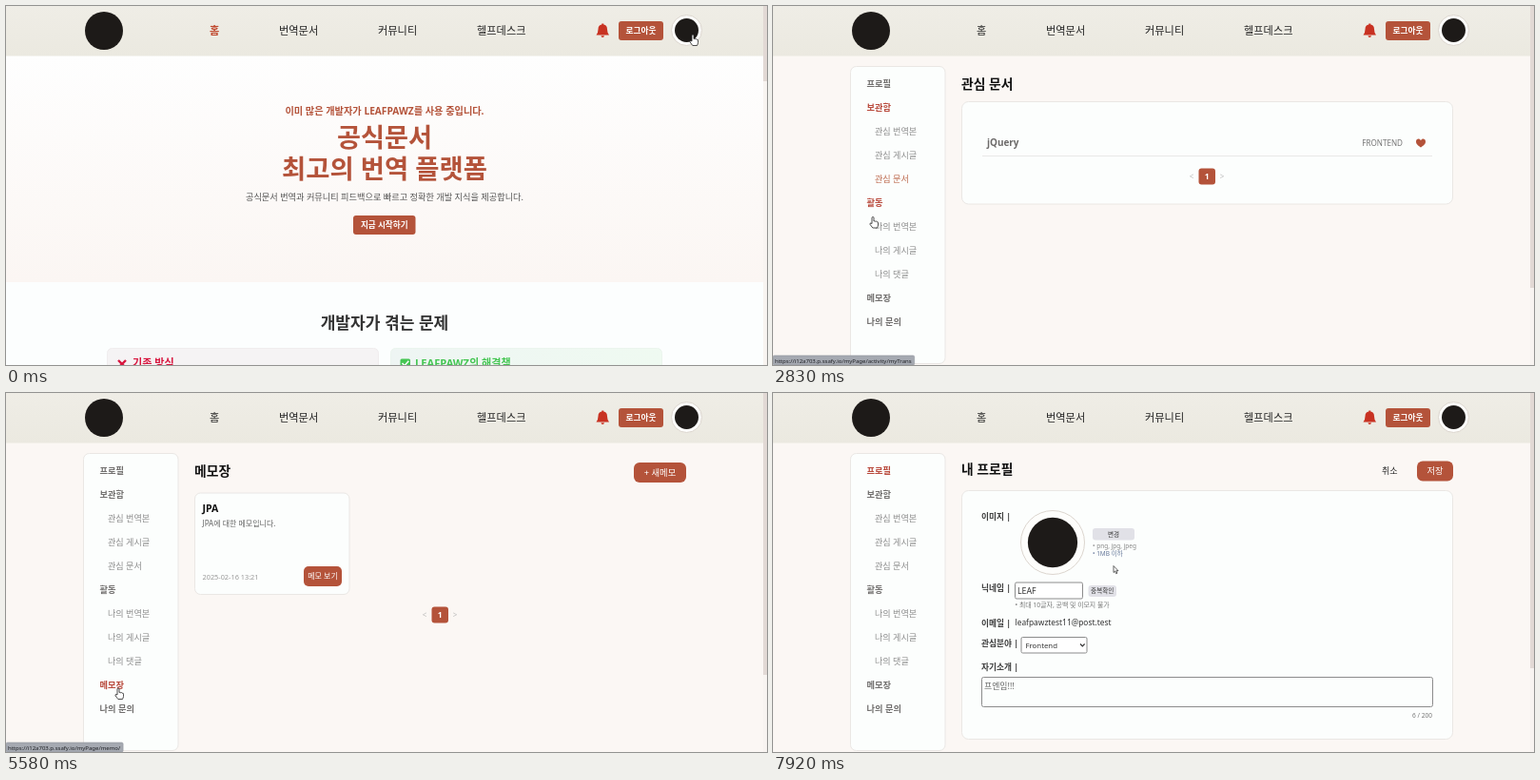
An HTML page for the animation above (8 s loop, 800x377 px).

```html
<!DOCTYPE html>
<html lang="ko">
<head>
<meta charset="utf-8">
<title>LEAFPAWZ</title>
<style>
html, body { margin: 0; width: 100%; height: 100%; overflow: hidden; background: #fbf7f4; }
svg { display: block; width: 100vw; height: 100vh; }
text { font-family: "Noto Sans", "Noto Sans CJK KR", "Noto Sans CJK", sans-serif; }
</style>
</head>
<body>
<svg id="stage" viewBox="0 0 800 377">
  <defs>
    <linearGradient id="bar" x2="0" y2="1"><stop stop-color="#efede6"/><stop offset="1" stop-color="#ebe9e0"/></linearGradient>
    <linearGradient id="hero" x2="0" y2="1"><stop stop-color="#fefefe"/><stop offset="1" stop-color="#fbf6f3"/></linearGradient>
    <linearGradient id="mint"><stop stop-color="#eef5f3"/><stop offset="1" stop-color="#effaf1"/></linearGradient>
    <path id="heart" d="M0 4.6C-2 2.8 -5 1.2 -5 -1.6C-5 -4.8 -1.300 -5.300 0 -2.800C1.300 -5.300 5 -4.800 5 -1.600C5 1.200 2 2.800 0 4.600Z"/>
  </defs>
  <g id="page"></g>
  <g id="status"><rect y="367" height="10" rx="1.5" fill="#a5a9b1" stroke="#8f939b" stroke-width=".5"/><text x="2" y="375" font-size="6" fill="#1d1f24"></text></g>
  <g id="cursor" stroke-linejoin="round">
    <path id="hand" fill="#fff" stroke="#222" stroke-width=".8" d="M-1 7V1Q-1 0 0 0T1 1V4.500Q2 3.800 2.700 4.800Q3.700 4.200 4.200 5.200Q5.500 4.800 5.500 6.200V8.500Q5.300 10 4.500 11.500H-.2L-3 7.800Q-3.300 6.300 -2 6.500Z"/>
    <path id="arrow" fill="#fff" stroke="#222" stroke-width=".7" d="M0 0V7L1.600 5.600L2.700 8.200L3.900 7.700L2.800 5.200H5Z"/>
  </g>
</svg>
<script>
const $ = id => document.getElementById(id);
const LOOP = 8000, STEP = 1000 / 12;
const BRICK = '#b4533a', CARD = '#fcfefd', LINE = '#eae7e4', INK = '#1d1a18';
const BRAND = 'LEAFPAWZ';

const text = (x, y, s, size, fill = '#666', weight = 400, anchor = 'start') =>
  `<text x="${x}" y="${y + size * 0.35}" font-size="${size}" fill="${fill}" font-weight="${weight}" text-anchor="${anchor}">${s}</text>`;
const box = (x, y, w, h, r, fill, stroke = 'none', sw = 1) =>
  `<rect x="${x}" y="${y}" width="${w}" height="${h}" rx="${r}" fill="${fill}" stroke="${stroke}" stroke-width="${sw}"/>`;
const rule = y => `<path d="M220 ${y}H693" stroke="#e9e8e7"/>`;
const heart = (x, y, fill = BRICK) => `<use href="#heart" x="${x}" y="${y}" fill="${fill}"/>`;
const button = (x, y, w, h, r, s, size, weight = 400, fill = BRICK, color = '#fff') =>
  box(x, y, w, h, r, fill) + text(x + w / 2, y + h / 2, s, size, color, weight, 'middle');
const avatar = (x, y, r) =>
  `<circle cx="${x}" cy="${y}" r="${r}" fill="#fdfdfb" stroke="#dcd6cf"/><circle cx="${x}" cy="${y}" r="${r * 0.78}" fill="${INK}"/>`;
const pager = y => text(440, y, '&lt;', 8, '#bbb', 400, 'middle') +
  button(447.5, y - 8.5, 17.5, 17, 3, '1', 8.5, 700) + text(472, y, '&gt;', 8, '#bbb', 400, 'middle');
const title = (s, y = 82) => text(198, y, s, 13.8, '#111', 700);
const card = bottom => box(198.5, 100.5, 516, bottom - 100.5, 7, CARD, LINE);

// Bookmark and translation lists share one row pitch.
const list = (name, rows, like) => {
  const end = 130 + rows.length * 27.5;
  const bottom = end + 50.5;
  let out = title(name) + card(Math.min(bottom, 390));
  rows.forEach(([s, note, size = 9.3], i) => {
    const y = 144 + i * 27.5;
    out += text(225, y, s, 9.95, '#6c6a69', 600) + text(like ? 662 : 687, y, note, size, '#777', 400, 'end') + rule(Math.round(y + 13) + 0.5);
    if (like) out += heart(681, y);
  });
  return out + (bottom < 377 ? pager(end + 21.5) : '');
};

const gift = (x, y, fill) => heart(x, y, fill) +
  `<path d="M${x - 4} ${y + 1.5}L${x + 3} ${y - 3.5}M${x - 2} ${y - 3}L${x + 2} ${y + 3}" stroke="#f6c431" stroke-width="1.7"/>`;
const gifts = (x, y, n, fill) => Array.from({ length: n }, (_, i) => gift(x + i * 11.5, y, fill)).join('');

function comments() {
  const rows = [
    ['헐~~~!!! 진짜 너무 서윗한 댓글', '57'],
    ['헐 같이 공부 화이팅해용 ㅋㅋ!!!!', '56'],
    ['헐 저는 vue는 너무 쉬워보여서 react 했어요 ㅋㅋ 멋있어서 ㅋㅋㅋ', '45'],
    ['헐!!!!! 지금 저한테 너무 도움이되는 내용이에영', '44']
  ];
  return title('나의 댓글') + card(282) + rows.map(([s, min], i) => {
    const y = 142.5 + i * 25.5;
    return text(225.5, y, s, 9.2, '#5f5d5c', 500) +
      text(687, y, '2025-02-18 08:' + min, 8.35, '#777', 400, 'end') + rule(Math.round(y + 12.5) + 0.5);
  }).join('') + gifts(352.5, 142.5, 9, '#e0352f') + gifts(356.5, 168.5, 4, '#e8405e') +
    text(453, 142.5, '감사해여 짱이에요 덕분에 모르던 것도 ...', 9.2, '#5f5d5c', 500) + pager(253);
}

const memo = () => title('메모장') + button(660, 73, 55, 21, 6, '+ 새메모', 9.3) +
  box(198.5, 105, 162.5, 106.5, 6, CARD, LINE) + text(206.5, 121, 'JPA', 10.5, '#111', 700) +
  text(206.5, 137, 'JPA에 대한 메모입니다.', 8) + text(206.5, 193, '2025-02-16 13:21', 7.35, '#999') +
  button(313, 182, 40, 21, 5, '메모 보기', 8) + pager(233);

function profile(edit) {
  const labels = [['이미지', 130], ['닉네임', 205], ['이메일', 241.5], ['관심분야', 262.5], ['자기소개', 287.5]];
  let out = title('내 프로필', 80) + box(198.5, 102.5, 516, 261, 7, CARD, LINE) + avatar(294, 157, 33.5) +
    labels.map(([s, y]) => text(219, y, s + ' |', 8.7, '#3c3c3c', 600)).join('');
  if (edit) {
    const edge = '#8c8c8c';
    out += text(640, 82, '취소', 9, '#222') + button(677, 71.5, 38, 21, 6, '저장', 9.2) +
      button(336, 142, 44, 12.5, 3, '변경', 6.6, 400, '#e1e1e7', '#333') +
      text(336, 161, '• png, jpg, jpeg', 6.5, '#888') + text(336, 169, '• 1MB 이하', 6.5, '#66789a') +
      box(254.5, 199, 71, 17, 1.5, '#fff', edge) +
      button(331.5, 202, 29.5, 12, 3, '중복확인', 6.6, 400, '#e1e1e7', '#333') +
      text(254.5, 223, '• 최대 10글자, 공백 및 이모지 불가', 6.9, '#777') +
      box(261, 256.5, 69, 16.5, 1.5, '#fff', edge) + box(219.5, 298.5, 474, 31, 2, CARD, edge) +
      '<path d="M323 263.5l2.300 2.400 2.300 -2.400" fill="none" stroke="#333" stroke-width="1.2"/>' +
      text(693, 339, '6 / 200', 6.6, '#777', 400, 'end');
  } else out += button(677, 71.5, 38, 21, 6, '수정', 9.2);
  return out + text(257, 208, 'LEAF', 8.8, '#333') + text(254.5, 241.5, 'leafpawztest11@post.test', 8.4, '#333') +
    text(265.5, 265, 'Frontend', 7.8, '#333') + text(222, 307.5, '프엔임!!!', 8.9);
}

const home = () => box(0, 52, 800, 325, 0, '#fcfefe') + box(0, 52, 796, 238, 0, 'url(#hero)') +
  text(398, 110, `이미 많은 개발자가 ${BRAND}를 사용 중입니다.`, 10.2, BRICK, 600, 'middle') +
  text(398, 138, '공식문서', 27.2, BRICK, 700, 'middle') +
  text(398, 171, '최고의 번역 플랫폼', 27.4, BRICK, 700, 'middle') +
  text(398, 201, '공식문서 번역과 커뮤니티 피드백으로 빠르고 정확한 개발 지식을 제공합니다.', 9.2, '#555', 400, 'middle') +
  button(365, 220, 65.5, 20, 3, '지금 시작하기', 8.6, 700) +
  text(398, 333.5, '개발자가 겪는 문제', 17.1, '#333', 700, 'middle') +
  box(106.5, 359.5, 285, 40, 5, '#f5f3f4', '#f0edee') + box(404.5, 359.5, 285, 40, 5, 'url(#mint)', '#ebf5ee') +
  '<path d="M118 372l8 8m0 -8l-8 8" stroke="#d8173f" stroke-width="2.4"/>' + text(133, 375.5, '기존 방식', 11.1, '#d8173f', 700) +
  box(414.5, 370.5, 10.5, 10, 1.5, '#45c653') + '<path d="M416.5 375l2.500 2.700 4.300 -5" fill="none" stroke="#fff" stroke-width="1.5"/>' +
  text(430, 375.5, BRAND + '의 해결책', 11.1, '#45c653', 700);

const header = atHome => box(0, 0, 800, 52.5, 0, 'url(#bar)') + `<circle cx="103" cy="26" r="20" fill="${INK}"/>` +
  [[214, '홈'], [287, '번역문서'], [391, '커뮤니티'], [495, '헬프데스크']].map(([x, s], i) =>
    text(x, 26, s, 11.2, atHome && !i ? '#c0492f' : '#222', atHome && !i ? 700 : 400)).join('') +
  '<path d="M620.5 30.5Q622.5 28 622.5 24.5Q622.5 20.3 626.3 19.6V18.5H628.3V19.6Q632 20.3 632 24.5Q632 28 634 30.5ZM625.5 31.3H629Q628.8 33 627.2 33T625.5 31.3Z" fill="#c83222"/>' +
  button(644, 16, 47, 20, 3, '로그아웃', 8.7, 700) + avatar(715.5, 25.5, 16);

const menu = [
  ['프로필', 'profile/'], ['보관함', 'archive/likeTrans'],
  ['관심 번역본', 'archive/likeTrans', 1], ['관심 게시글', 'archive/likeArticle', 1], ['관심 문서', 'archive/likeDocs', 1],
  ['활동', 'activity/myTrans'],
  ['나의 번역본', 'activity/myTrans', 5], ['나의 게시글', 'activity/myArticle', 5], ['나의 댓글', 'activity/myComment', 5],
  ['메모장', 'memo/'], ['나의 문의', 'inquiry/']
];
const sidebar = (active, hover) => box(81.5, 63.5, 99.5, 312, 6, CARD, LINE) + menu.map(([s, , parent], i) => {
  const lit = i === active || i === hover || i === menu[active][2];
  return parent ? text(107, 82 + i * 25, s, 9.1, lit ? '#bd6a4e' : '#8c8c8c')
    : text(98.5, 82 + i * 25, s, 9.25, lit ? '#b8483a' : '#706e6d', 700);
}).join('');

const marked = [['Spring Boot 3', '18 14:50'], ['MySQL 6', '17 16:50'], ['MySQL 3', '17 16:46'], ['MyBatis 14', '17 16:44'],
  ['MyBatis 8', '17 16:41'], ['Spring Boot 19', '17 16:30'], ['Spring Boot 16', '17 16:28'], ['Spring Boot 10', '17 16:24'],
  ['Spring Boot 7', '17 16:23']].map(([s, d]) => [s + '번째 문단 번역본', '2025-02-' + d]);
const mine = ['16:13', '16:12', '16:12'].map(d => ['Spring Boot 3번째 문단 번역본', d]);

// start, selected menu entry, scrollbar end, content
const scenes = [
  [0, -1, 79, home],
  [415, 0, 296, () => profile(false)],
  [1245, 2, 231, () => list('관심 번역본', marked, true)],
  [1745, 3, 296, () => list('관심 게시글', [], true)],
  [2245, 4, 296, () => list('관심 문서', [['jQuery', 'FRONTEND', 8.1]], true)],
  [2995, 6, 296, () => list('나의 번역본', mine, false)],
  [3995, 7, 296, () => list('나의 게시글', [], false)],
  [4410, 8, 296, comments],
  [5325, 9, 296, memo],
  [6410, 0, 296, () => profile(false)],
  [7575, 0, 289, () => profile(true)]
];

// time, x, y of the pointer tip
const path = [[0, 722, 30], [500, 722, 30], [1160, 122, 131], [1330, 122, 131], [1580, 120, 155], [1920, 120, 155],
  [2160, 118, 181], [2410, 118, 181], [2740, 105, 221.5], [3080, 105, 221.5], [3330, 112, 234], [3740, 114, 260],
  [4080, 114, 260], [4330, 119, 287], [4910, 119, 287], [5240, 118, 310], [5500, 118, 310], [6000, 123, 76],
  [6580, 123, 76], [7240, 696, 82], [7575, 696, 82], [7900, 358, 181.5]];

function pointer(t) {
  const i = path.findIndex(k => k[0] > t);
  if (i < 0) return path[path.length - 1].slice(1);
  const [a, b] = [path[i - 1], path[i]];
  const u = (t - a[0]) / (b[0] - a[0]), e = u * u * (3 - 2 * u);
  return [1, 2].map(k => a[k] + (b[k] - a[k]) * e);
}

let shown = '';
function draw(time) {
  const t = Math.floor(time / STEP) * STEP;
  const [x, y] = pointer(t);
  const n = scenes.filter(s => s[0] <= t).length - 1;
  const [, active, thumb, content] = scenes[n];
  const row = Math.round((y - 85) / 25);
  const hover = n && x > 95 && x < 152 && menu[row] ? row : -1;

  if (shown !== n + ':' + hover) {
    shown = n + ':' + hover;
    $('page').innerHTML = box(0, 0, 800, 377, 0, '#fbf7f4') + content() + (n ? sidebar(active, hover) : '') +
      header(!n) + box(796, 0, 4, 377, 0, '#f8f4f1') + box(796, 0, 4, thumb, 0, '#e2d9d5');
    $('status').style.display = hover < 0 ? 'none' : '';
    if (hover >= 0) {
      const [bar, label] = $('status').children;
      label.textContent = 'https://i12a703.p.ssafy.io/myPage/' + menu[hover][1];
      bar.setAttribute('width', label.getComputedTextLength() + 5);
    }
  }
  const link = hover >= 0 || (x > 677 && y < 95);
  $('hand').style.display = link ? '' : 'none';
  $('arrow').style.display = link ? 'none' : '';
  $('cursor').setAttribute('transform', `translate(${x} ${y})`);
}

const start = performance.now();
function tick() {
  draw((performance.now() - start) % LOOP);
  requestAnimationFrame(tick);
}
tick();
</script>
</body>
</html>
```
